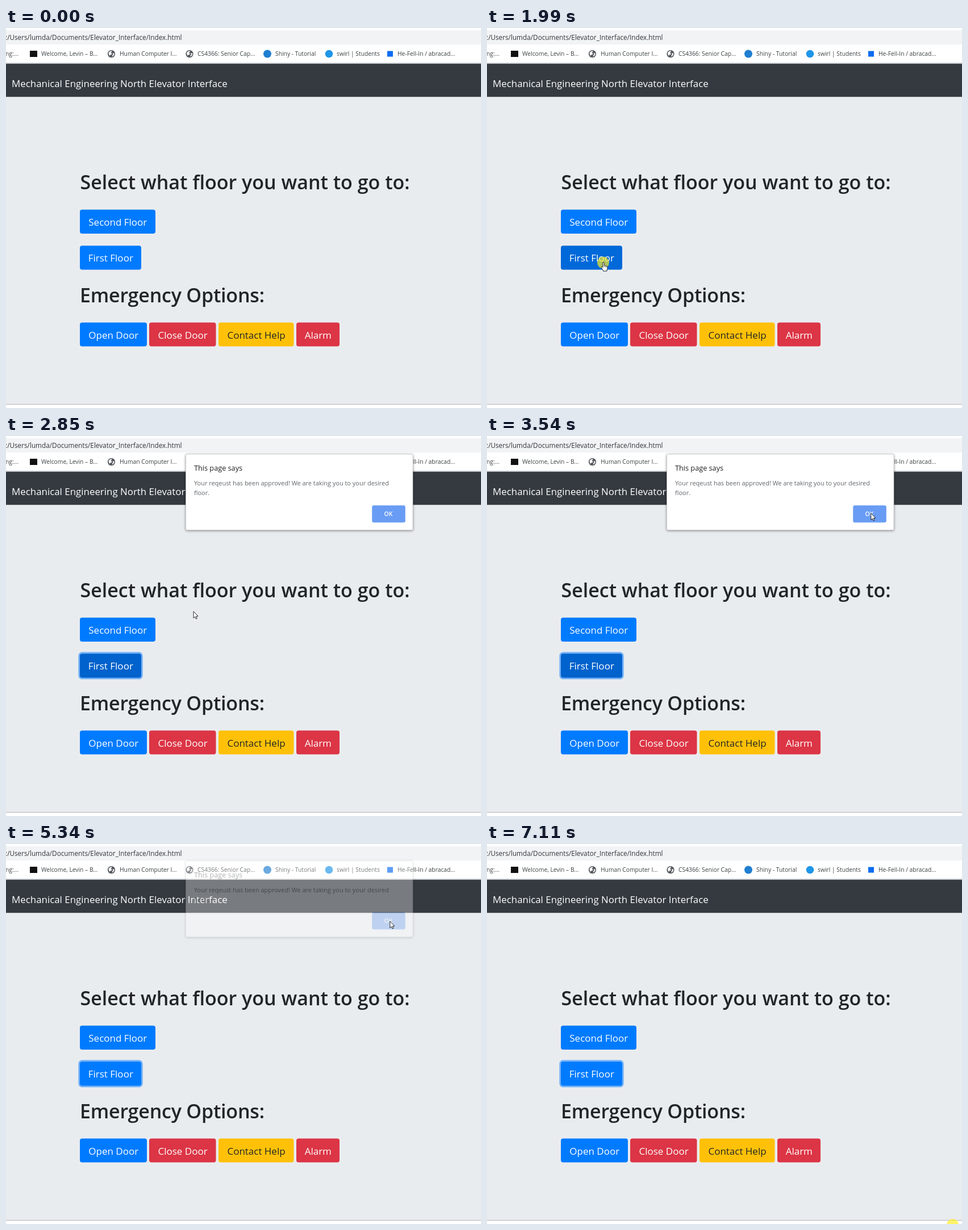
An HTML page for the animation above (7.18 s loop, 836 by 669 pixels).

```html
<!DOCTYPE html>
<html lang="en">
<head>
<meta charset="utf-8">
<title>Elevator Interface</title>
<style>
  html, body { margin: 0; width: 100%; height: 100%; overflow: hidden; background: #fff; }
  svg { display: block; width: 836px; height: 669px; font-family: "Open Sans", "Noto Sans", sans-serif; }
  .url { font-size: 11.75px; fill: #33363a; }
  .mark { font-size: 10.3px; fill: #3c4043; }
  .brand { font-size: 16.9px; fill: #fff; }
  .head { font-size: 34px; font-weight: 600; fill: #212529; }
  .btn { font-size: 17px; text-anchor: middle; }
  .card { filter: drop-shadow(0 1px 2px rgba(0,0,0,.45)); }
  .says { font-size: 12.7px; fill: #202124; }
  .msg { font-size: 10.95px; fill: #62666b; }
  .ok { font-size: 10.4px; font-weight: 600; fill: #fff; text-anchor: middle; }
</style>
</head>
<body>
<svg viewBox="0 0 836 669">
  <defs>
    <g id="globe">
      <circle r="6.6" fill="#54575c"/>
      <path d="M-5-2Q-3-5 0-5.2L1-3.4-1.4-1.8 1-.6 0 1.6-2 1.4-3 3.6Q-5 1.5-5-2ZM2.2-1.2 5.2-1Q5.4 2.5 2 4.8L.8 3.4 3 1.6Z" fill="#fff"/>
    </g>
  </defs>

  <rect width="836" height="669" fill="#fff"/>
  <rect y="4" width="836" height="25" fill="#f1f3f4"/>
  <text class="url" x="-1" y="21.3">:/Users/lumda/Documents/Elevator_Interface/Index.html</text>

  <g class="mark">
    <text x="-1" y="49.2">ng:...</text>
    <text x="62" y="49.2">Welcome, Levin – B...</text>
    <text x="200" y="49.2">Human Computer I...</text>
    <text x="337" y="49.2">CS4366: Senior Cap...</text>
    <text x="474" y="49.2">Shiny - Tutorial</text>
    <text x="582" y="49.2">swirl | Students</text>
    <text x="689" y="49.2">He-Fell-In / abracad...</text>
  </g>
  <rect x="42" y="40" width="13" height="11" fill="#111"/>
  <use href="#globe" x="185.5" y="45.5"/>
  <use href="#globe" x="323" y="45.5"/>
  <circle cx="460" cy="45.5" r="7" fill="#1f7fd0"/>
  <circle cx="568.5" cy="45.5" r="6.8" fill="#1e96e8"/>
  <rect x="671" y="40.5" width="10" height="10" fill="#0a6cf0"/>

  <rect y="61" width="836" height="2" fill="#c9cccf"/>
  <rect y="63" width="836" height="58.5" fill="#343a40"/>
  <text class="brand" x="10" y="104">Mechanical Engineering North Elevator Interface</text>

  <rect y="121.5" width="836" height="541" fill="#e9ecef"/>
  <rect y="662" width="836" height="1.2" fill="#b9bcc0"/>
  <text class="head" x="130.5" y="284.3">Select what floor you want to go to:</text>
  <text class="head" x="130" y="483.3" letter-spacing="-.2">Emergency Options:</text>

  <rect id="ring" x="127.3" y="380.3" width="113.4" height="48" rx="6.5" fill="#007bff" opacity=".5"/>
  <g id="buttons"></g>

  <g id="dialog">
    <rect class="card" x="316.5" y="32" width="399.5" height="133.5" rx="2" fill="#fff" stroke="#c4c6c9" stroke-width=".7"/>
    <text class="says" x="331" y="61.3">This page says</text>
    <text class="msg" x="331" y="86.8">Your reqeust has been approved! We are taking you to your desired</text>
    <text class="msg" x="331" y="104.3">floor.</text>
    <rect x="644.5" y="122.5" width="58" height="29.5" rx="2.5" fill="#699cf4" stroke="#86b1f7"/>
    <text class="ok" x="673" y="140.7">OK</text>
  </g>

  <g id="cursor" fill="#fff" stroke="#111" stroke-width=".9" stroke-linejoin="round">
    <circle id="click" cx="-.5" r="10.5" fill="#ffee22" stroke="none" opacity=".68"/>
    <path id="arrow" d="M.3 0V11.7L3 9.3 4.6 13.1 6.5 12.3 4.9 8.6 8.3 8.3Z"/>
    <g id="hand">
      <path d="M-1.2 8.5V.8Q-1.2-.6 0-.6T1.2.8V5Q3 4.3 3.5 5.6 5 5 5.4 6.4 7 6 7 7.6V10.5L6 13V15H-.6V13.5L-3.8 9Q-4.2 7.4-2.6 7.2Z"/>
      <path d="M1.2 5V8M3.4 5.8V8.4M5.4 6.6V8.6" fill="none" stroke-width=".6"/>
    </g>
  </g>
</svg>
<script>
const LOOP = 7180;
const HOVER = 980, PRESS = 2080, FOCUS = 2160, OPEN = 2230, LEAVE = 2690, CLOSE = 5250;
const BLUE = "#007bff", RED = "#dc3545";
const NS = "http://www.w3.org/2000/svg";
const $ = id => document.getElementById(id);
const show = (id, on) => $(id).style.display = on ? "" : "none";
const within = (t, from, to) => t >= from && t < to;

function add(parent, tag, attrs, text) {
  const el = document.createElementNS(NS, tag);
  for (const k in attrs) el.setAttribute(k, attrs[k]);
  if (text) el.textContent = text;
  parent.append(el);
  return el;
}

function button(x, y, width, fill, label, ink = "#fff") {
  const box = add($("buttons"), "rect", { x, y, width, height: 42.2, rx: 4, fill });
  add($("buttons"), "text", { class: "btn", x: x + width / 2 + .3, y: y + 28.2, fill: ink }, label);
  return box;
}

button(130, 319.7, 133, BLUE, "Second Floor");
const first = button(130, 383.2, 108, BLUE, "First Floor");
button(130, 518.4, 118, BLUE, "Open Door");
button(252, 518.4, 117.5, RED, "Close Door");
button(374, 518.4, 132.5, "#ffc107", "Contact Help", "#212529");
button(511, 518.4, 76, RED, "Alarm");

// Progress 0..1 in n jumps, the first at `from`, the last at `to`.
function jumps(t, from, to, n) {
  if (t < from) return 0;
  return Math.min(n, Math.floor((t - from) / (to - from) * (n - 1) + .01) + 1) / n;
}

// Cursor strokes: quadratic curves from a past c to b, in n jumps.
const glides = [
  { from: 140, to: 290, n: 3, a: [741, 656], c: [606, 506], b: [499.5, 436.5] },
  { from: 520, to: 1060, n: 8, a: [472, 442], c: [330, 462], b: [205, 413] },
  { from: LEAVE, to: 3390, n: 10, a: [222, 402], c: [470, 170], b: [668, 139] },
  { from: 3460, to: 3540, n: 2, a: [671, 139], c: [673, 138], b: [675.5, 136] },
  { from: 6110, to: 6340, n: 4, a: [648, 200], c: [680, 420], b: [850, 600] },
  { from: 6490, to: 6880, n: 6, a: [829, 573], c: [812, 610], b: [820, 670.5] }
];

function place(t) {
  const g = glides.findLast(g => t >= g.from);
  if (!g) return [900, 800];
  const p = (jumps(t, g.from, g.to, g.n) * g.n - 1) / (g.n - 1);
  const q = 1 - p;
  return g.a.map((a, i) => q * q * a + 2 * q * p * g.c[i] + p * p * g.b[i]);
}

function draw(t) {
  const hand = within(t, HOVER, LEAVE);
  $("cursor").setAttribute("transform", `translate(${place(t)})`);
  show("hand", hand);
  show("arrow", !hand);
  show("click", within(t, 1990, OPEN) || within(t, 5100, CLOSE) || t >= 7110);

  const fill = within(t, PRESS, CLOSE) ? "#0062cc" : within(t, HOVER, PRESS) ? "#0069d9" : BLUE;
  first.setAttribute("fill", fill);
  show("ring", t >= FOCUS);

  const opened = jumps(t, OPEN, 2390, 3), closed = jumps(t, CLOSE, 5420, 3);
  const lift = opened < 1 ? 3 : 3 * closed;
  $("dialog").setAttribute("opacity", Math.min(1, opened * 1.5) * (1 - closed));
  $("dialog").setAttribute("transform", `translate(0 ${-lift})`);
}

const start = performance.now();
function tick(now) {
  draw(Math.max(0, now - start) % LOOP);
  requestAnimationFrame(tick);
}
draw(0);
requestAnimationFrame(tick);
</script>
</body>
</html>
```
